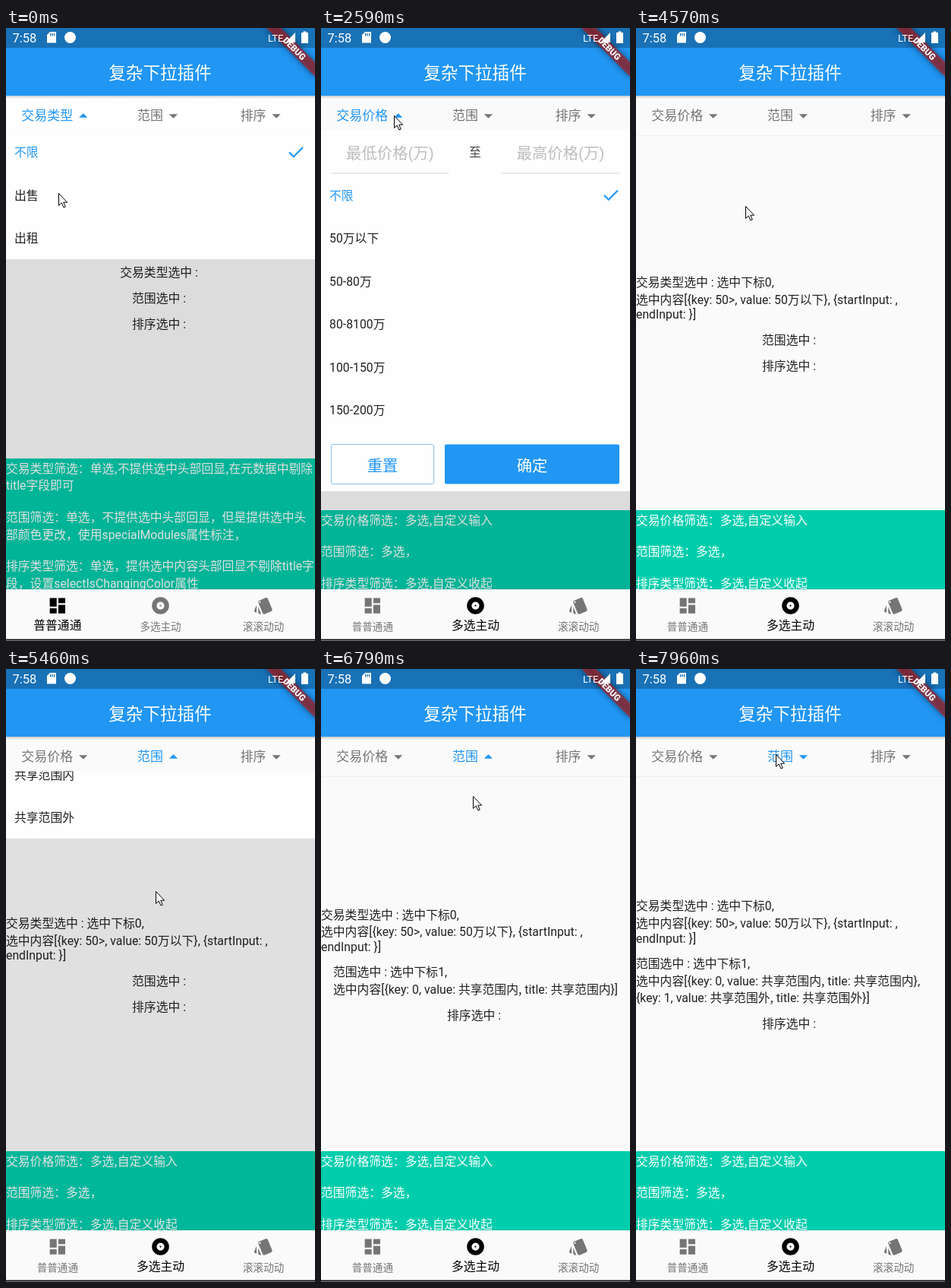
Animation, 407 px wide and 806 px high, one loop 8000 ms. Source, as an HTML page with a canvas:

```html
<!DOCTYPE html>
<html lang="zh-CN">
<head>
<meta charset="utf-8">
<style>
html, body { margin: 0; height: 100%; overflow: hidden; background: #fafafa; }
canvas { display: block; width: 407px; height: 806px; }
</style>
</head>
<body>
<canvas id="stage"></canvas>
<script>
const W = 407, H = 806, LOOP = 8000, STEP = 140;
const BAR = 89, TOP = 134.5, NAV = 738;
const DP = 1.1306, ROW = 50 * DP, BODY = 14 * DP, SMALL = 12 * DP, LARGE = 18 * DP;
const LINE = 22.7, LATIN_LINE = 18.9;
const BLUE = '#2196f3', INK = '#212121', GREY = '#757575';
const HAN = '"Noto Sans CJK SC", "Noto Sans CJK", sans-serif';
const LATIN = 'Roboto, ' + HAN;

const canvas = document.getElementById('stage');
const c = canvas.getContext('2d');
const dpr = window.devicePixelRatio || 1;
canvas.width = W * dpr;
canvas.height = H * dpr;

// Spans in which the screen refreshes, in even steps of about STEP ms
const BURSTS = [
  [270, 820], [1240, 1920], [2590, 2590], [2870, 3900],
  [4030, 5000], [5150, 6150], [6270, 7200], [7360, 7960]
];

// Pointer moves: start, end, x and y reached
const HOME = [69, 217];
const MOVES = [
  [133, 820, 206, 762], [1376, 1920, 96, 115], [2723, 3164, 62, 272],
  [3311, 3900, 228, 567], [4030, 4584, 144, 234], [4584, 5000, 190, 104],
  [5150, 5436, 197, 292], [5436, 6007, 95, 220], [6270, 6669, 190, 112],
  [6669, 6801, 200, 167], [6801, 7200, 100, 277], [7360, 7960, 184, 112]
];

const span = (t, a, b) => Math.max(0, Math.min(1, (t - a) / (b - a)));
const ease = k => k * k * (3 - 2 * k);

function snap(t) {
  const burst = BURSTS.filter(b => b[0] <= t).pop();
  if (!burst) return 0;
  const [a, b] = burst, n = Math.round((b - a) / STEP);
  if (!n) return a;
  const pitch = (b - a) / n;
  return a + pitch * Math.min(n, Math.floor((t - a) / pitch + 0.12));
}

function pointer(t) {
  return MOVES.reduce(([px, py], [a, b, x, y]) => {
    const k = ease(span(t, a, b));
    return [px + (x - px) * k, py + (y - py) * k];
  }, HOME);
}

function rect(x, y, w, h, color) {
  c.fillStyle = color;
  c.fillRect(x, y, w, h);
}

// A comma after a Han character is set in the Han font
const RUNS = /[\u2e80-\uffef][\u2e80-\uffef,]*|[^\u2e80-\uffef]+/g;

function eachRun(s, size, paint) {
  return s.match(RUNS).reduce((x, run) => {
    c.font = `${size}px ${run[0] < '\u2e80' ? LATIN : HAN}`;
    if (paint) paint(run, x);
    return x + c.measureText(run).width;
  }, 0);
}

// y is the middle of the line
function text(s, x, y, color = INK, size = BODY) {
  c.fillStyle = color;
  const base = Math.round(y + size * 0.375);
  eachRun(s, size, (run, dx) => c.fillText(run, x + dx, base));
}

function centred(s, x, y, color, size = BODY) {
  text(s, x - eachRun(s, size) / 2, y, color, size);
}

// Stacked paragraphs around a middle height; long ones start at the left edge
function flow(paragraphs, mid) {
  const gap = LINE / 2;
  const tall = s => /[\u2e80-\uffef]/.test(s) ? LINE : LATIN_LINE;
  const total = paragraphs.flat().reduce((sum, s) => sum + tall(s), gap * (paragraphs.length - 1));
  let y = mid - total / 2;
  for (const lines of paragraphs) {
    const wide = Math.max(...lines.map(s => eachRun(s, BODY)));
    for (const s of lines) {
      text(s, lines.length > 2 ? 0 : (W - wide) / 2, y + tall(s) * 0.76 - BODY * 0.375);
      y += tall(s);
    }
    y += gap;
  }
}

function poly(points, color) {
  c.beginPath();
  points.forEach(p => c.lineTo(...p));
  c.closePath();
  c.fillStyle = color;
  c.fill();
}

function clipped(y, h, paint) {
  c.save();
  c.beginPath();
  c.rect(0, y, W, h);
  c.clip();
  paint();
  c.restore();
}

function header(first, open, lit) {
  [first, '范围', '排序'].forEach((label, i) => {
    const color = i === open || i === lit ? BLUE : GREY;
    const d = i === open ? -1 : 1, size = 15 * DP, icon = 24 * DP;
    const w = label.length * size, x = W * (i + 0.5) / 3 - (w + icon) / 2;
    const tip = x + w + icon / 2, mid = 115.5 + d / 2, r = 5 * DP;
    text(label, x, 115, color, size);
    poly([[tip - r, mid - r / 2 * d], [tip + r, mid - r / 2 * d], [tip, mid + r / 2 * d]], color);
  });
}

function rows(items, y, chosen) {
  items.forEach((item, i) => {
    const mid = y + ROW * (i + 0.5) + 0.6;
    text(item, 11, mid, i === chosen ? BLUE : INK);
    if (i !== chosen) return;
    c.beginPath();
    c.moveTo(373, mid);
    c.lineTo(378.8, mid + 5.8);
    c.lineTo(391, mid - 6.4);
    c.strokeStyle = BLUE;
    c.lineWidth = 2.2;
    c.stroke();
  });
}

// Menu of the given height, slid down by k, with the shade under it
function menu(height, k, paint) {
  const bottom = TOP + height * k;
  rect(0, bottom, W, NAV - bottom, `rgba(0,0,0,${0.12 * Math.min(1, k * 1.7)})`);
  if (k > 0) clipped(TOP, NAV - TOP, () => {
    c.translate(0, height * (k - 1));
    rect(0, TOP, W, height, '#fefefe');
    paint();
  });
}

function notes(top, lines) {
  rect(0, top, W, NAV - top, '#00cdac');
  let y = top + 12.7;
  for (const s of lines) {
    if (s) text(s, 0, y, '#fff');
    y += s ? LINE : LATIN_LINE;
  }
}

function page(x, paint) {
  clipped(BAR, NAV - BAR, () => {
    c.translate(x, 0);
    rect(0, BAR, W, NAV - BAR, '#fafafa');
    paint();
  });
}

const EMPTY = [['交易类型选中 : '], ['范围选中 : '], ['排序选中 : ']];

function singlePage() {
  rect(0, BAR, W, TOP - BAR, '#fefefe');
  header('交易类型', 0);
  flow(EMPTY, 355);
  notes(566, [
    '交易类型筛选：单选,不提供选中头部回显,在元数据中剔除',
    'title字段即可',
    '',
    '范围筛选：单选，不提供选中头部回显，但是提供选中头',
    '部颜色更改，使用specialModules属性标注，',
    '',
    '排序类型筛选：单选，提供选中内容头部回显不剔除title字',
    '段，设置selectIsChangingColor属性'
  ]);
  menu(ROW * 3, 1, () => rows(['不限', '出售', '出租'], TOP, 0));
}

function priceMenu(chosen) {
  [['最低价格(万)', 91], ['最高价格(万)', 315.5]].forEach(([hint, x]) => {
    centred(hint, x, 164, '#bdbdbd', LARGE);
    rect(x - 77.5, 190.5, 155, 1, '#d8d8d8');
  });
  centred('至', 203, 163, '#424242');
  rows(['不限', '50万以下', '50-80万', '80-8100万', '100-150万', '150-200万'], TOP + ROW, chosen);
  c.beginPath();
  c.roundRect(13.5, 547.5, 135, 52, 2);
  c.strokeStyle = '#8ebfe8';
  c.lineWidth = 1;
  c.stroke();
  c.beginPath();
  c.roundRect(163, 547.5, 230, 52, 2);
  c.fillStyle = BLUE;
  c.fill();
  centred('重置', 81, 575, BLUE, LARGE);
  centred('确定', 278, 575, '#fff', LARGE);
}

function results(t) {
  const [type, range, sort] = EMPTY;
  const price = ['交易类型选中 : 选中下标0,', '选中内容[{key: 50>, value: 50万以下}, {startInput: ,', 'endInput: }]'];
  const inner = '选中内容[{key: 0, value: 共享范围内, title: 共享范围内}';
  const one = ['范围选中 : 选中下标1,', inner + ']'];
  const two = [one[0], inner + ',', '{key: 1, value: 共享范围外, title: 共享范围外}]'];
  return [t < 4030 ? type : price, t < 6270 ? range : t < 7360 ? one : two, sort];
}

function multiPage(t) {
  const price = t >= 2590 && t < 4030;
  const again = t >= 6795 && t < 7360;
  const range = again || (t >= 5150 && t < 6270);
  rect(0, 141, W, 1, '#efefef');
  header('交易价格', price ? 0 : range ? 1 : -1, t >= 6270 ? 1 : -1);
  flow(results(t), 388.8);
  notes(634, ['交易价格筛选：多选,自定义输入', '', '范围筛选：多选，', '', '排序类型筛选：多选,自定义收起']);
  if (price) menu(474.5, 1, () => priceMenu(t > 3300 ? 1 : 0));
  if (range) {
    const from = again ? 6802 : 5298;
    menu(ROW * 3, span(t, from, from + 265), () =>
      rows(['不限', '共享范围内', '共享范围外'], TOP, again ? 1 : 0));
  }
}

// Icons on a 24 unit grid
const tiles = new Path2D('M3 3h8v10H3zM3 15h8v6H3zM13 3h8v6h-8zM13 11h8v10h-8z');
const disc = new Path2D();
[10, 4.5, 1].forEach(r => {
  disc.moveTo(12 + r, 12);
  disc.arc(12, 12, r, 0, 7);
});
const cards = new Path2D('M3.9 20.2V11.2L1.2 17.6Q.9 19 2.5 19.6zM5.9 19.7q0 2 2 2h1.4L5.9 13.4z');
const card = new Path2D();
card.roundRect(-6, -8.5, 12, 17, 2);
card.arc(-4, -6.5, 1, 0, 7);
cards.addPath(card, new DOMMatrix().translate(14, 12.2).rotate(-22.4));
const TABS = [['普普通通', tiles], ['多选主动', disc], ['滚滚动动', cards]];
const ARROW = new Path2D('M.5.5V16.4L4.2 13L7 19L9.3 18L6.7 12.2H11.6Z');

function nav(active) {
  rect(0, NAV, W, H - NAV, '#fafafa');
  rect(0, NAV - 1, W, 1, 'rgba(0,0,0,.08)');
  TABS.forEach(([label, icon], i) => {
    const on = i === active, x = W * (i + 0.5) / 3, color = on ? '#000' : GREY;
    c.save();
    c.translate(x - 12 * DP, 746);
    c.scale(DP, DP);
    c.fillStyle = color;
    c.fill(icon, 'evenodd');
    c.restore();
    centred(label, x, on ? 785 : 786.5, color, on ? BODY : SMALL);
  });
  rect(0, 803.5, W, 2, '#111');
}

function banner() {
  c.save();
  c.translate(W, 0);
  c.rotate(Math.PI / 4);
  const ribbon = color => rect(-40 * DP, 28 * DP, 80 * DP, 12 * DP, color);
  c.filter = `blur(${4 * dpr}px)`;
  ribbon('rgba(0,0,0,.5)');
  c.filter = 'none';
  ribbon('rgba(183,28,28,.63)');
  c.font = `900 ${10.2 * DP}px ${LATIN}`;
  c.textAlign = 'center';
  c.fillStyle = '#fff';
  c.fillText('DEBUG', 0, 42.5);
  c.restore();
}

function appBar() {
  const fade = c.createLinearGradient(0, BAR, 0, BAR + 4);
  fade.addColorStop(0, 'rgba(0,0,0,.2)');
  fade.addColorStop(1, 'rgba(0,0,0,0)');
  rect(0, BAR, W, 4, fade);
  rect(0, 0, W, BAR, BLUE);
  rect(0, 0, W, 26, '#1971b6');
  centred('复杂下拉插件', 203, 59, '#fff', 20 * DP);
  banner();

  text('7:58', 8.5, 13, '#fff', 16.5);
  poly([[58, 5], [66, 5], [66, 19.5], [54, 19.5], [54, 9]], '#fff');
  for (let x = 58; x < 65; x += 2.5) rect(x, 7, 1.3, 3.5, '#1971b6');
  c.beginPath();
  c.arc(84.5, 12.5, 7.5, 0, 7);
  c.fillStyle = '#fff';
  c.fill();
  text('LTE', 345, 13, '#fff', 13);
  poly([[368, 19], [381, 19], [381, 6]], '#fff');
  rect(391.5, 4.5, 4, 2, '#fff');
  rect(389, 6, 9, 14, '#fff');
}

function draw(t) {
  c.setTransform(dpr, 0, 0, dpr, 0, 0);
  const slide = W * (1 - span(t, 1052, 1376)) ** 3;
  if (slide > 0) page(slide - W, singlePage);
  if (slide < W) page(slide, () => multiPage(t));
  nav(t < 1240 ? 0 : 1);
  appBar();

  c.save();
  c.translate(...pointer(t));
  c.fillStyle = '#fff';
  c.fill(ARROW);
  c.strokeStyle = '#000';
  c.lineWidth = 1;
  c.stroke(ARROW);
  c.restore();
}

const start = performance.now();
function tick() {
  draw(snap((performance.now() - start) % LOOP));
  requestAnimationFrame(tick);
}
tick();
</script>
</body>
</html>
```
